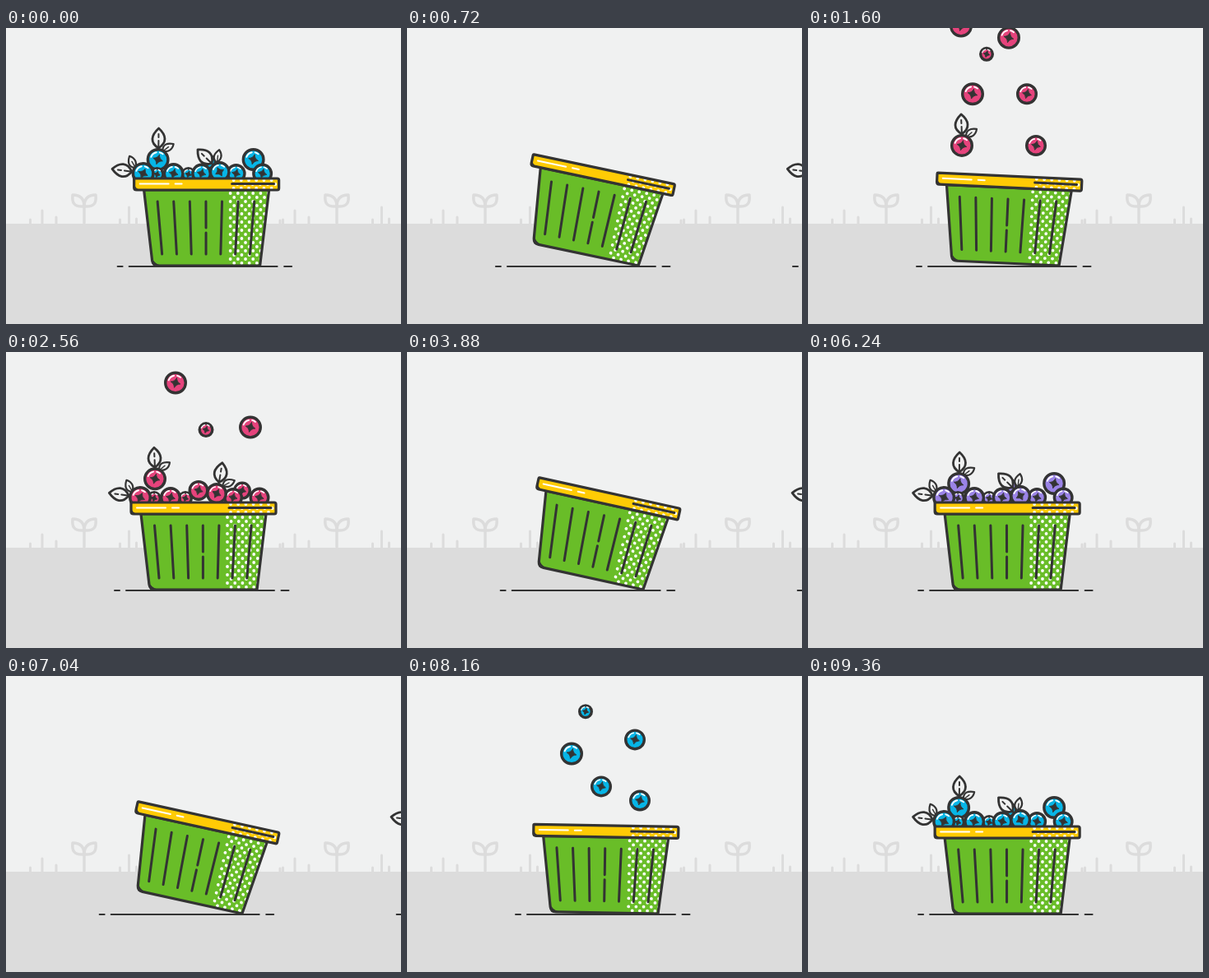
Animation of 480x360 px, one loop 9400 ms. Source, as an HTML page with a canvas:

```html
<!DOCTYPE html>
<html lang="en">
<head>
<meta charset="utf-8">
<title>Berry baskets</title>
<style>
html, body { margin: 0; width: 100%; height: 100%; overflow: hidden; background: #f0f1f1; }
canvas { display: block; width: 480px; height: 360px; }
</style>
</head>
<body>
<canvas id="stage"></canvas>
<script>
const canvas = document.getElementById('stage');
const ctx = canvas.getContext('2d');
const scale = window.devicePixelRatio || 1;
canvas.width = 480 * scale;
canvas.height = 360 * scale;

const SKY = '#f0f1f1', GROUND = '#dcdcdc', INK = '#333333';
const GREEN = '#69bd28', YELLOW = '#ffcb05';
const COLORS = ['#e5437c', '#9a83e6', '#07b5e6']; // cranberry, plum, blueberry

const STEP = 40, LOOP_STEPS = 235, CYCLE = 78, HOLD_STEP = 149;
const SPACING = 361, SLIDE_START = 73.3, SLIDE_STEPS = 33;
const FALL_SPEED = 28.5, TILT_GRAVITY = 0.0407;
const TILT_HOPS = [[5.7, 41.9], [41.9, 51.9], [51.9, 58]];

// x, radius, step at which the berry passes the rim, leafy
const STREAM = [
  [187, 14, 41.3, true], [277, 13, 41.3], [200, 14, 43.5], [266, 13, 43.5],
  [217, 9, 45.2], [244, 14, 45.9], [186, 14, 46.4], [283, 13, 48],
  [236, 13, 48.6], [200, 14, 50], [277, 13, 50.6], [217, 9, 51.8],
  [180, 9, 54.9], [277, 13, 56.35], [200, 14, 58.4], [283, 13, 60.4],
  [287, 11, 64.4], [206, 14, 69]
];
// x, y, radius, landing step, leaf turn [from, to, first step, last step]
const HEAP = [
  [181, 160, 14, 64.2, [0, 3, 64, 68]],
  [297, 160, 14, 66.4],
  [243, 163, 9.5, 66.4],
  [180, 178, 9, 54.3],
  [218, 178, 9, 60.1],
  [276, 177, 12, 54.2],
  [234, 177, 12.5, 64.3],
  [200, 177, 13, 56.45],
  [163, 177, 14, 54.2, [0, -80, 52, 63.6]],
  [256, 175, 13, 64.1, [12, -43, 64, 69]],
  [308, 177, 12.5, 61]
];

const clamp = v => Math.max(0, Math.min(1, v));

// Strong ease in and out: cubic bezier (0.9, 0, 0.1, 1)
function ease(x) {
  x = clamp(x);
  let low = 0, high = 1;
  for (let i = 0; i < 24; i++) {
    const u = (low + high) / 2, w = 1 - u;
    if (2.7 * u * w * w + 0.3 * u * u * w + u * u * u < x) low = u; else high = u;
  }
  return low * low * (3 - 2 * low);
}

function slideOffset(step) {
  const arrive = ease((step + CYCLE - SLIDE_START) / SLIDE_STEPS);
  const leave = ease((step - SLIDE_START) / SLIDE_STEPS);
  return SPACING * (arrive + leave - 1);
}

function tiltDegrees(step) {
  const hop = TILT_HOPS.find(([a, b]) => step > a && step < b);
  return hop ? TILT_GRAVITY * (step - hop[0]) * (hop[1] - step) : 0;
}

function stroke(color, width, draw) {
  ctx.strokeStyle = color;
  ctx.lineWidth = width;
  ctx.beginPath();
  draw();
  ctx.stroke();
}

function line(x1, y1, x2, y2, width = 3, color = INK) {
  stroke(color, width, () => { ctx.moveTo(x1, y1); ctx.lineTo(x2, y2); });
}

function shape(path, fill, width = 0) {
  const p = new Path2D(path);
  ctx.fillStyle = fill;
  ctx.fill(p);
  if (width) {
    ctx.strokeStyle = INK;
    ctx.lineWidth = width;
    ctx.stroke(p);
  }
}

function sprout(x) {
  line(x, 237, x, 217, 3.5, GROUND);
  for (const side of [-1, 1]) {
    stroke(GROUND, 3.5, () => {
      ctx.moveTo(x, 217);
      ctx.bezierCurveTo(x + side * 13, 218, x + side * 15, 212, x + side * 14, 203);
      ctx.bezierCurveTo(x + side * 5, 203, x, 207, x, 217);
    });
  }
}

function background() {
  ctx.fillStyle = SKY;
  ctx.fillRect(0, 0, 480, 360);
  ctx.fillStyle = GROUND;
  ctx.fillRect(0, 238, 480, 122);
  for (const x of [0, 307]) {
    sprout(x + 95);
    for (const [dx, top] of [[29.5, 233], [44, 222], [61, 230], [138.5, 233], [149.5, 218], [158.5, 232]]) {
      line(x + dx, top, x + dx, 238, 3, GROUND);
    }
  }
  line(333, 234, 333, 238, 3, GROUND);
}

function leaves() {
  shape('M0-14C-11-20-10-29-1-38C9-30 10-21 0-14Z', SKY, 2.8);
  line(0, -12, -0.4, -23, 2);
  line(-0.6, -27, -0.8, -31, 2);
  shape('M5-11C5-19 10-21 18-20C17-13 12-9 5-11Z', SKY, 2.2);
  line(5, -10, 12, -16, 1.4);
}

function berry(x, y, r, color, leafy, degrees = 0) {
  ctx.save();
  ctx.translate(x, y);
  ctx.rotate(degrees * Math.PI / 180);
  if (leafy) leaves();
  ctx.fillStyle = color;
  stroke(INK, 3.4, () => { ctx.arc(0, 0, r - 1.7, 0, 7); ctx.fill(); });
  const s = r * 0.43, q = s * 0.22;
  ctx.rotate(0.25);
  shape(`M0 ${-s}Q${q} ${-q} ${s} 0Q${q} ${q} 0 ${s}Q${-q} ${q} ${-s} 0Q${-q} ${-q} 0 ${-s}Z`, INK, 0.8);
  ctx.rotate(-0.25 - degrees * Math.PI / 180);
  stroke('#fff', r * 0.13, () => ctx.arc(0, 0, r * 0.64, 3.5, 4.5));
  stroke('#fff', r * 0.13, () => ctx.arc(0, 0, r * 0.64, 4.95, 5.45));
  ctx.restore();
}

function berries(step, color) {
  for (const [x, r, pass, leafy] of STREAM) {
    const y = 180 + FALL_SPEED * (step - pass);
    if (y > -20 && y < 215) berry(x, y, r, color, leafy);
  }
  for (const [x, restY, r, land, turn] of HEAP) {
    const y = restY - FALL_SPEED * Math.max(0, land - step);
    if (y < -20) continue;
    let degrees = 0;
    if (turn) {
      const [from, to, first, last] = turn;
      degrees = from + (to - from) * clamp((step - first) / (last - first));
    }
    berry(x, y, r, color, Boolean(turn), degrees);
  }
}

function dots(clipPath, left, top, right, bottom) {
  ctx.save();
  ctx.clip(new Path2D(clipPath));
  ctx.fillStyle = '#fff';
  for (let y = top, row = 0; y < bottom; y += 5, row++) {
    for (let x = left + (row % 2) * 4.6; x < right; x += 9.2) {
      ctx.beginPath();
      ctx.arc(x, y, 1.9, 0, 7);
      ctx.fill();
    }
  }
  ctx.restore();
}

function basket(degrees) {
  const body = 'M164 197L174 283Q175 289 181 289H305L316 197Z';
  const rim = 'M153 183H326Q328 183 328 185V195Q328 197 326 197H155Q152 197 152 194V184Q152 183 153 183Z';
  ctx.save();
  ctx.translate(305, 290);
  ctx.rotate(degrees * Math.PI / 180);
  ctx.translate(-305, -290);

  shape(body, GREEN);
  dots(body, 269, 201, 318, 289);
  shape(body, 'transparent', 3.2);
  shape('M173 279Q176 287 184 289H177Q174 289 173 279Z', INK, 1);
  for (let i = 0; i < 7; i++) {
    const top = 180.5 + i * 19.6, bottom = 186 + i * 17.8;
    if (i === 3) {
      line(top, 211, 239.4, 243);
      line(239.4, 249, bottom, 275);
    } else {
      line(top, 211, bottom, 275);
    }
  }

  shape(rim, YELLOW);
  dots(rim, 273, 185, 327, 198);
  shape(rim, 'transparent', 3.2);
  shape('M152 190Q153 196 159 197H153Z', INK, 1);
  line(159, 189.5, 194, 189.5, 2, '#fff');
  line(202, 189.5, 210, 189.5, 2, '#fff');
  line(271, 189.5, 322, 189.5);
  ctx.restore();
}

function station(step, color) {
  const x = slideOffset(step);
  if (Math.abs(x) > 400) return;
  ctx.save();
  ctx.translate(x, 0);
  for (const [a, b] of [[132, 138], [146, 326], [334.5, 343.5]]) line(a, 290, b, 290, 2);
  berries(step, color);
  basket(tiltDegrees(step));
  ctx.restore();
}

function render(now) {
  let frame = Math.floor(now / STEP) % LOOP_STEPS;
  if (frame >= HOLD_STEP) frame--; // one step is held while everything rests
  const cycle = Math.floor(frame / CYCLE), step = frame % CYCLE;
  ctx.setTransform(scale, 0, 0, scale, 0, 0);
  ctx.lineCap = ctx.lineJoin = 'round';
  background();
  station(step + CYCLE, COLORS[(cycle + 2) % 3]);
  station(step, COLORS[cycle]);
}

const start = performance.now();
function tick() {
  render(performance.now() - start);
  requestAnimationFrame(tick);
}
tick();
</script>
</body>
</html>
```
